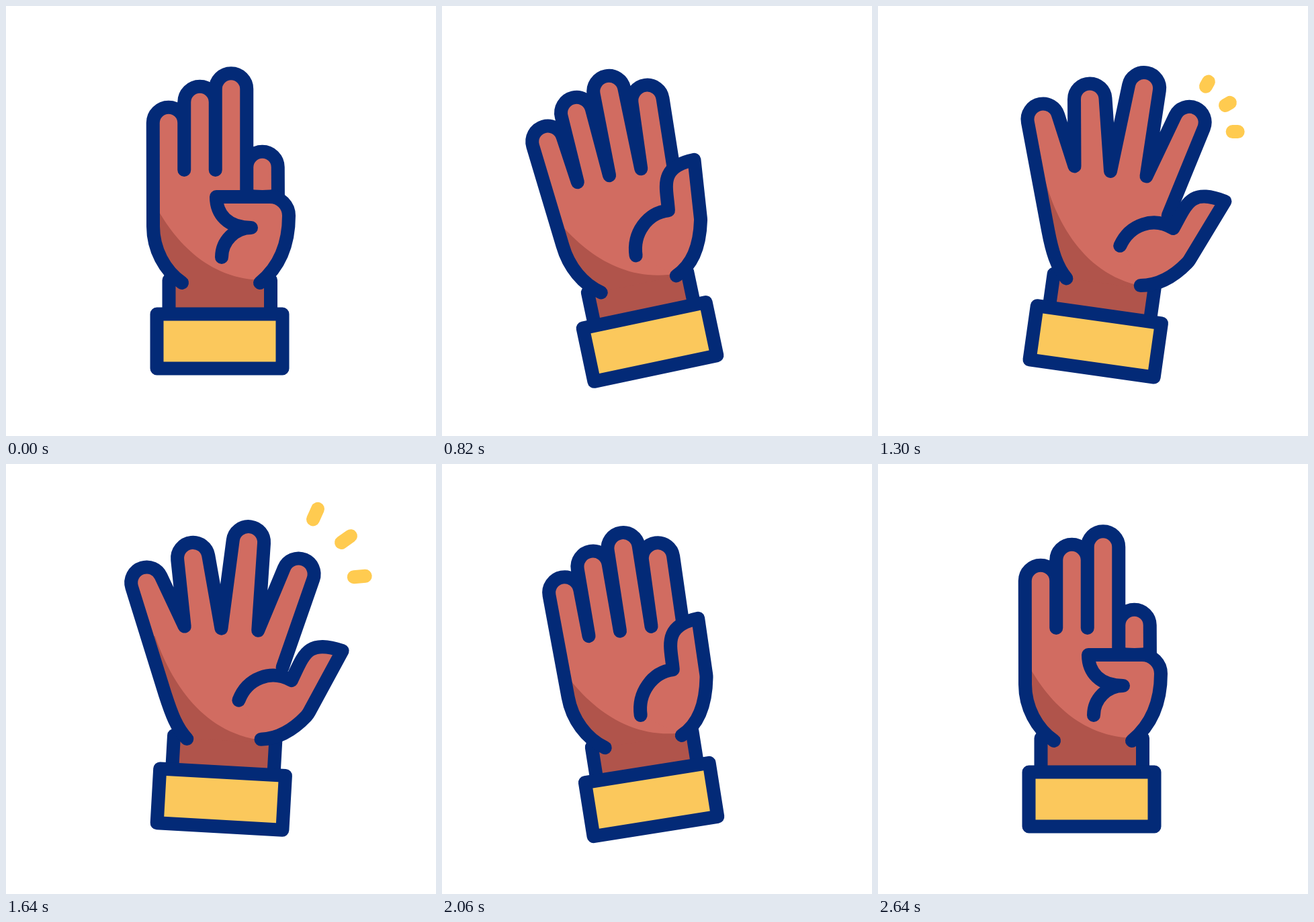
Animation of 640x640 px, one loop 3000 ms. Source, as an HTML page with a canvas:

```html
<!DOCTYPE html>
<html lang="en">
<head>
<meta charset="utf-8">
<title>Waving hand</title>
<style>
  html, body { margin: 0; width: 100%; height: 100%; overflow: hidden; background: #fff; }
  canvas { display: block; width: 640px; height: 640px; }
</style>
</head>
<body>
<canvas id="stage" width="640" height="640"></canvas>
<script>
const ctx = document.getElementById('stage').getContext('2d');
const LOOP = 3000;
const NAVY = '#032a77', SKIN = '#d16c61', SHADE = '#b0544b', CUFF = '#fbc85c', SPARK = '#ffcb50';
const PIVOT = [318, 540];
const PITCH = 46.5, TIP_R = PITCH / 2;

// Tracks of [time, value], eased with a half cosine between keys
const TILT = [[200, 0], [800, -12], [1435, 10.4], [1940, -9.7], [2640, 0]];
const UNFOLD = [[200, 0], [800, 1], [2020, 1], [2640, 0]];
const SPREAD = [[520, 0], [1520, 1], [1600, 1], [2150, 0]];

// Pinky to index: tip height when closed, and how far the tip moves when spread
const FINGERS = [
  { y: 174, move: [-53.5, 9.5] },
  { y: 143, move: [-33, 0] },
  { y: 123.5, move: [2, -9] },
  { y: 144, move: [33, 14] }
];

// Thumb key points: tip, the two web handles, notch, outer corner, heel handle
const FOLDED = [[313, 284], [313, 310], [330, 330], [365, 330], [421, 284], [421, 377]];
const UP = [[426, 242], [370, 245], [380, 280], [378, 312.5], [427, 328], [417, 394]];
const OUT = [[486.5, 268.5], [433, 254], [430, 276], [413, 316.5], [440, 366], [408, 403]];

const rad = d => d * Math.PI / 180;
const clamp = (v, a = 0, b = 1) => Math.min(b, Math.max(a, v));
const lerp = (a, b, k) => a + (b - a) * k;
const mix = (a, b, k) => [lerp(a[0], b[0], k), lerp(a[1], b[1], k)];

function track(keys, t) {
  if (t <= keys[0][0]) return keys[0][1];
  for (let i = 1; i < keys.length; i++) {
    const [t0, v0] = keys[i - 1], [t1, v1] = keys[i];
    if (t < t1) return lerp(v0, v1, (1 - Math.cos(Math.PI * (t - t0) / (t1 - t0))) / 2);
  }
  return keys[keys.length - 1][1];
}

// Angle on the tip circle where the line from point v touches it
function touch(c, v, side) {
  const dx = v[0] - c[0], dy = v[1] - c[1];
  return Math.atan2(dy, dx) + side * Math.acos(Math.min(1, TIP_R / Math.hypot(dx, dy)));
}

function addFinger(path, tip, left, right) {
  path.arc(...tip, TIP_R, touch(tip, left, 1), touch(tip, right, -1));
  path.lineTo(...right);
}

function stroke(path, color = NAVY, width = 20) {
  ctx.strokeStyle = color;
  ctx.lineWidth = width;
  ctx.stroke(path);
}

function fill(path, color) {
  ctx.fillStyle = color;
  ctx.fill(path);
}

function clipped(area, paint) {
  ctx.save();
  ctx.clip(area);
  paint();
  ctx.restore();
}

function drawHand(p, s) {
  const tips = FINGERS.map(({ y, move }, i) => [242 + PITCH * i + move[0] * s, y + move[1] * s]);
  const valleys = [0, 1, 2].map(i => [242 + PITCH * (i + 0.5) + (8.5 * i - 16.5) * s, 244 + s]);
  valleys.push(mix([405, 300], [398, 298], s));
  tips[3][1] += 96 * (1 - p);
  valleys[2][1] += 46 * (1 - p);

  // The palm edge leaves the pinky in the direction of its side
  const knuckle = mix([219, 328], [226, 348], s);
  const lean = mix([0, 34], [11, 28], s);
  const hand = new Path2D();
  hand.moveTo(262, 412);
  hand.bezierCurveTo(...mix([236, 394], [246, 397], s), knuckle[0] + lean[0], knuckle[1] + lean[1], ...knuckle);
  tips.forEach((tip, i) => addFinger(hand, tip, i ? valleys[i - 1] : knuckle, valleys[i]));

  const palm = new Path2D(hand);
  palm.lineTo(378, 412);
  palm.closePath();
  fill(palm, SKIN);
  clipped(palm, () => fill(new Path2D('M206 262C232 325 285 408 385 408V416H190V262Z'), SHADE));
  fill(new Path2D('M242 411H394V460H242Z'), SHADE);
  stroke(new Path2D('M242.5 408V458M394 408V458'));
  stroke(hand);
  if (p < 0.85) drawFold(p, tips[3], valleys[2], valleys[3]);
}

// Crease that runs up the index finger while it unbends
function drawFold(p, tip, left, right) {
  const finger = new Path2D();
  addFinger(finger, tip, left, right);
  finger.lineTo(...left);
  finger.closePath();
  const y = 283 - 184 * p, line = new Path2D();
  line.moveTo(tip[0] - 28, y - 2);
  line.quadraticCurveTo(tip[0], y + 4, tip[0] + 28, y - 2);
  clipped(finger, () => stroke(line));
}

function drawThumb(p, s) {
  const points = FOLDED.map((f, i) => mix(mix(f, UP[i], p), OUT[i], s));
  const [tip, web1, web2, notch, corner, heel] = points;
  tip[0] += 20 * p * (1 - p);
  tip[1] -= 62 * p * (1 - p);
  const end = mix([321, 374], [336, 350], s);
  const wrist = mix([378, 412], [372, 406.5], s);
  const bend = [end[0] + 20 * s, notch[1] - 28 * s];

  const thumb = new Path2D();
  thumb.moveTo(...end);
  thumb.bezierCurveTo(...mix(end, bend, 0.55), ...mix(notch, bend, 0.55), ...notch);
  thumb.bezierCurveTo(...web2, ...web1, ...tip);
  thumb.arcTo(...corner, ...heel, 28);
  thumb.quadraticCurveTo(...heel, ...wrist);
  fill(thumb, SKIN);
  stroke(thumb);
}

function drawCuff() {
  const cuff = new Path2D('M224.5 458.5H411.5V539.5H224.5Z');
  fill(cuff, CUFF);
  stroke(cuff);
}

// Three dashes fanning out from the index finger
function drawSparks(t) {
  const size = clamp((t - 1200) / 80) * clamp((1820 - t) / 70);
  if (size <= 0) return;
  const k = clamp((t - 1300) / 340, -0.3, 1.1);
  const cx = lerp(400, 394, k), cy = 172;
  const radius = lerp(81, 112, k), half = lerp(4, 8.5, k);
  for (let i = 0; i < 3; i++) {
    const a = rad(21 + 30.5 * i), line = new Path2D();
    for (const r of [radius - half, radius + half]) {
      line.lineTo(cx + r * Math.sin(a), cy - r * Math.cos(a));
    }
    stroke(line, SPARK, 20 * size);
  }
}

function draw(now) {
  const t = now % LOOP;
  const p = track(UNFOLD, t), s = track(SPREAD, t);
  ctx.setTransform(1, 0, 0, 1, 0, 0);
  ctx.fillStyle = '#fff';
  ctx.fillRect(0, 0, 640, 640);
  ctx.lineCap = ctx.lineJoin = 'round';
  ctx.translate(...PIVOT);
  ctx.rotate(rad(track(TILT, t)));
  ctx.translate(-PIVOT[0], -PIVOT[1]);
  drawHand(p, s);
  drawThumb(p, s);
  drawCuff();
  drawSparks(t);
  requestAnimationFrame(draw);
}

draw(performance.now());
</script>
</body>
</html>
```
